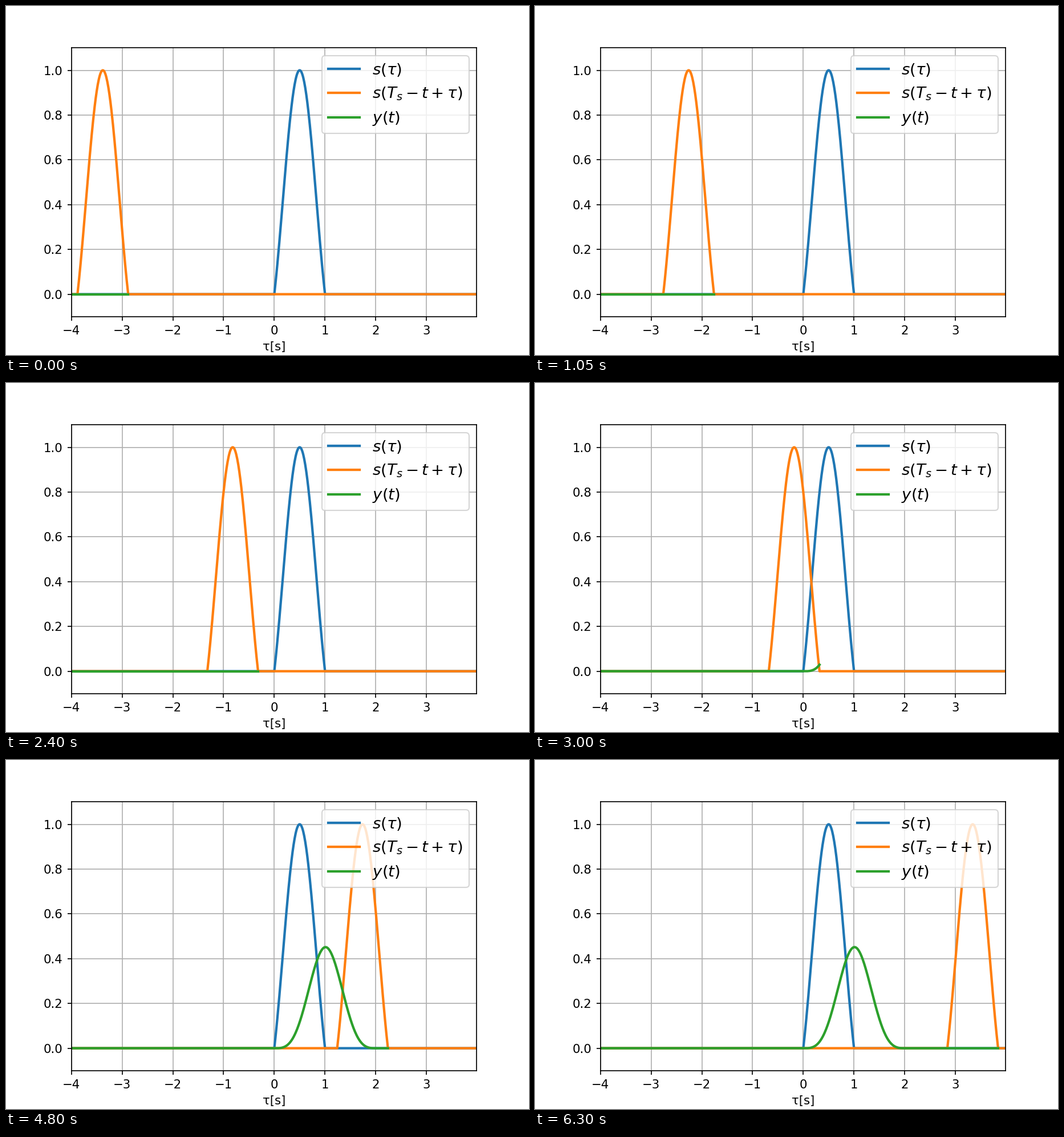
A matplotlib script that plays this animation: 917x611 px, repeating every 6450 ms.

```python
import numpy as np
import matplotlib.pyplot as plt
from matplotlib.animation import FuncAnimation

WIDTH, HEIGHT = 917, 611
DPI = 152.8125
FRAMES, INTERVAL = 43, 150
DT = 0.01
T_START, T_STEP = -2.88, 0.16
T_S = 1.0

tau = np.round(-4 + DT * np.arange(800), 2)


def pulse(x):
    """Main lobe of a sinc, from 0 to T_S."""
    inside = (x > -1e-6) & (x < T_S + 1e-6)
    return np.where(inside, np.sinc(2 * (x / T_S - 0.5)), 0.0)


s = pulse(tau)
y = np.convolve(s, s, "same") * DT

# The small margin keeps the pixel size from rounding down.
fig, ax = plt.subplots(
    figsize=((WIDTH + 0.001) / DPI, (HEIGHT + 0.001) / DPI), dpi=DPI
)
ax.plot(tau, s, lw=2, label=r"$s(\tau)$")
(moving,) = ax.plot(tau, s, lw=2, label=r"$s(T_s-t+\tau)$")
(output,) = ax.plot([], [], lw=2, label=r"$y(t)$")
ax.set_xlim(tau[0], tau[-1])
ax.set_ylim(-0.1, 1.1)
ax.set_xlabel("τ[s]")
ax.grid(True)
ax.legend(loc="upper right", fontsize=13)


def update(frame):
    t = T_START + T_STEP * frame
    moving.set_ydata(pulse(T_S - t + tau))
    done = tau < t + DT / 2
    output.set_data(tau[done], y[done])
    return moving, output


anim = FuncAnimation(fig, update, frames=FRAMES, interval=INTERVAL, repeat=True)
plt.show()
```
